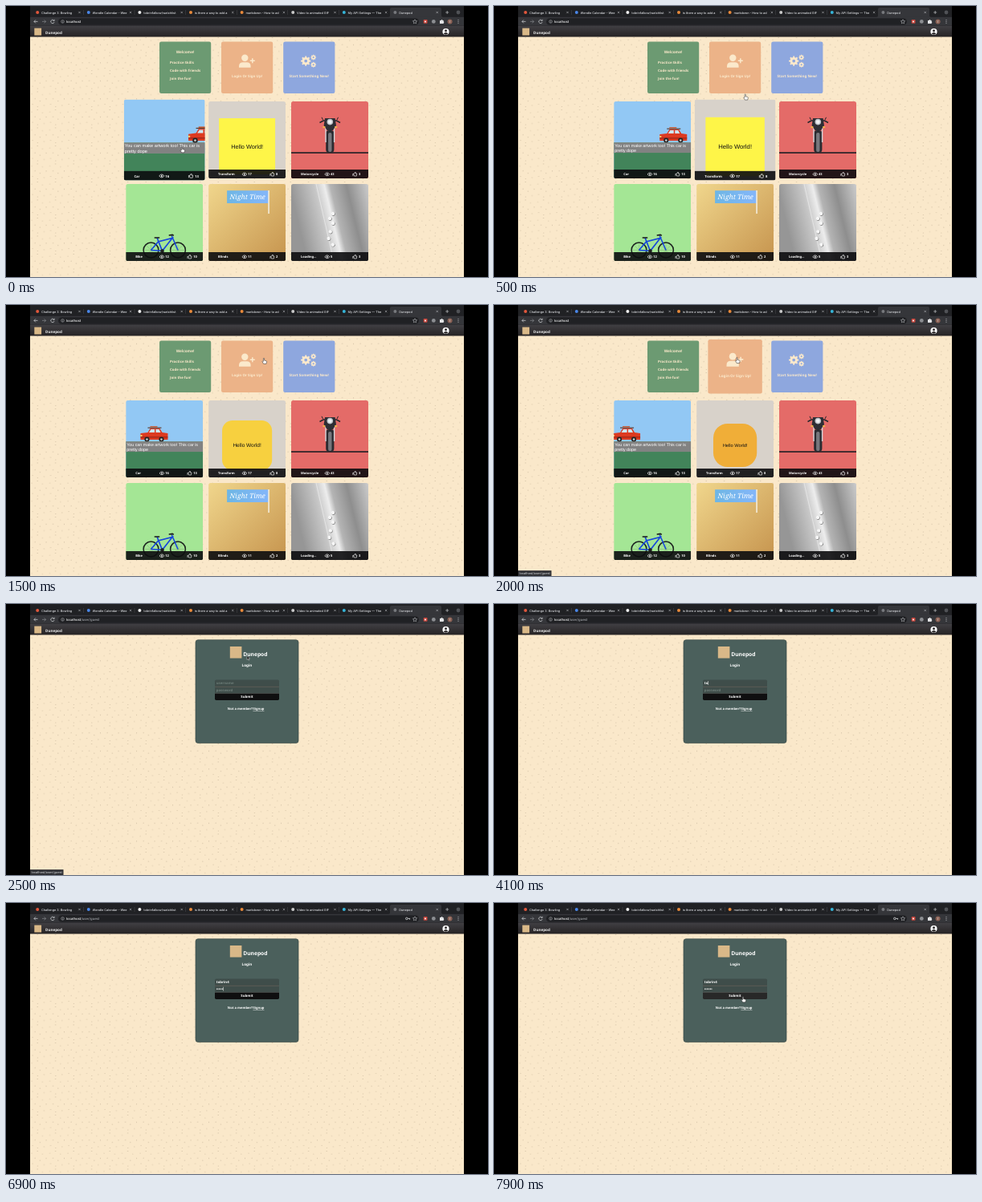
Animation, 600 px wide and 338 px high, one loop 8 s. Source, as an HTML page:

```html
<!DOCTYPE html>
<html lang="en">
<head>
<meta charset="utf-8">
<title>Dunepod</title>
<style>
  html, body { margin: 0; width: 100%; height: 100%; overflow: hidden; background: #000; }
  svg { display: block; width: 100vw; height: 100vh; }
  text { font-family: "Noto Sans", "Open Sans", sans-serif; font-weight: 600; text-rendering: geometricPrecision; }
  .ui { font-family: Inter, Roboto, sans-serif; font-weight: 500; }
  .art { font-family: "Liberation Sans", sans-serif; font-weight: 400; }
</style>
</head>
<body>
<svg id="stage" viewBox="0 0 600 338"></svg>
<script>
const LOOP = 8000;
const CREAM = '#fbe9cb', TAN = '#d9b888';

const rect = (x, y, w, h, fill, extra = '') =>
  `<rect x="${x}" y="${y}" width="${w}" height="${h}" fill="${fill}" ${extra}/>`;
const circle = (x, y, r, fill, extra = '') =>
  `<circle cx="${x}" cy="${y}" r="${r}" fill="${fill}" ${extra}/>`;
const line = (d, stroke, width = .6, extra = '') =>
  `<path d="${d}" fill="none" stroke="${stroke}" stroke-width="${width}" ${extra}/>`;
const shape = (d, fill, extra = '') => `<path d="${d}" fill="${fill}" ${extra}/>`;
const text = (x, y, size, str, fill = '#fff', extra = '') =>
  `<text x="${x}" y="${y}" font-size="${size}" fill="${fill}" ${extra}>${str}</text>`;
const group = (inner, extra = '') => `<g ${extra}>${inner}</g>`;
const MID = 'text-anchor="middle"';

const defs = `<defs>
  <pattern id="dots" x="30" y="38" width="22.5" height="22.5" patternUnits="userSpaceOnUse">
    ${rect(0, 0, 22.5, 22.5, '#fae8ca')}
    ${[[2, 4], [9, 1.5], [15.5, 5], [20, 10.5], [6, 10], [12.5, 13], [3, 17], [17.5, 18.5], [9.5, 20]]
      .map(([x, y]) => circle(x, y, .42, '#9c8a70')).join('')}
  </pattern>
  <linearGradient id="nav" x2="0" y2="1"><stop stop-color="#414044"/><stop offset="1" stop-color="#262324"/></linearGradient>
  <linearGradient id="sand" x2="1" y2="1"><stop stop-color="#f0d68c"/><stop offset="1" stop-color="#c6944e"/></linearGradient>
  <linearGradient id="flag"><stop stop-color="#6db6e4"/><stop offset="1" stop-color="#84b6fa"/></linearGradient>
  <linearGradient id="metal" y1=".12" x2="1" y2="-.12">
    <stop stop-color="#969696"/><stop offset=".3" stop-color="#c6c6c6"/><stop offset=".43" stop-color="#ededed"/>
    <stop offset=".5" stop-color="#b4b4b4"/><stop offset=".7" stop-color="#8e8e8e"/><stop offset="1" stop-color="#d2d2d2"/>
  </linearGradient>
  <clipPath id="cardClip"><rect width="96" height="96" rx="2.6"/></clipPath>
  <clipPath id="page"><rect x="30" width="540" height="338"/></clipPath>
  <clipPath id="tabClip"><rect width="43.5" height="14"/></clipPath>
</defs>`;

/* Browser window */
const tabs = [
  ['Challenge 3: Bowling', '#e2573c'], ['Wendle Calendar - Wee', '#4a86e8'],
  ['tobrinfalkow/watchlist', '#eee'], ['is there a way to add a', '#e8893a'],
  ['markdown - How to ad', '#e8893a'], ['Video to animated GIF', '#c9c9c9'],
  ['My API Settings — The', '#35b4d8'], ['Dunepod', '#77797d']
];
const cross = (x, y) => line(`M${x - 1.2} ${y - 1.2}l2.4 2.4m0 -2.4l-2.4 2.4`, '#c4c6ca', .5);

function browser() {
  let out = rect(30, 0, 540, 14, '#202124') +
    shape('M476 14q2 0 2-2V4q0-2 2-2h60q2 0 2 2v8q0 2 2 2z', '#35363a') +
    rect(30, 13.8, 540, 10.8, '#35363a');
  tabs.forEach(([name, color], i) => {
    const x = 39.2 + i * 63.6;
    out += circle(x, 8, 2, color) + cross(x + 52.3, 8) +
      group(text(0, 9.5, 3.8, name, '#dcdee2', 'class="ui"'), `transform="translate(${x + 4.8} 0)" clip-path="url(#tabClip)"`);
    if (i < 6) out += rect(x + 57, 5, .4, 6, '#54565a');
  });
  out += line('M547.2 8h4m-2-2v4', '#d5d7da', .6) + circle(563, 8, 2.4, '#505256') +
    line('M39.5 19.4h-4.6m2-2l-2 2 2 2', '#d5d7da', .7) +
    line('M45 19.4h4.6m-2-2l2 2-2 2', '#85878b', .7) +
    line('M59.6 18a2.2 2.2 0 1 0 .5 2M60.2 16.8v1.6h-1.7', '#d5d7da', .7) +
    rect(65, 15.2, 449, 8.6, '#202124', 'rx="4.3"') +
    circle(70.5, 19.4, 1.8, 'none', 'stroke="#c5c7ca" stroke-width=".5"') +
    line('M70.5 18.4v.3m0 .5v1.3', '#c5c7ca', .5) +
    `<text class="ui" x="75" y="21" font-size="4.2" fill="#fff">localhost<tspan id="path" fill="#a3a6aa">/user/guest</tspan></text>` +
    shape('M509 16.8l.8 1.7 1.8.2-1.3 1.3.3 1.8-1.6-.9-1.6.9.3-1.8-1.3-1.3 1.8-.2z', 'none', 'stroke="#d5d7da" stroke-width=".5"') +
    rect(519.7, 17, 4.8, 4.8, '#c9473e', 'rx=".8"') + circle(522, 19.4, 1, '#fff') +
    circle(532.3, 19.4, 2.4, '#8c8e92') +
    shape('M540 18h1.5a1 1 0 0 1 2 0h1.2v1.4a1 1 0 0 1 0 1.8v.9H540z', '#e3e4e6') +
    circle(552.6, 19.4, 3, '#8b6256') + text(552.6, 20.6, 3.2, 'T', '#fff', MID + ' class="ui"') +
    [17.6, 19.4, 21.2].map(y => circle(563, y, .5, '#d5d7da')).join('') +
    group(circle(498.8, 19.4, 1.3, 'none', 'stroke="#d5d7da" stroke-width=".8"') +
      line('M500.1 19.4h3m-.6 0v1.3', '#d5d7da', .8), 'id="key"');
  return out;
}

const navbar = rect(30, 24.5, 540, 14, 'url(#nav)') + rect(35.3, 27.6, 8.8, 9, TAN) +
  text(49, 35.3, 4.6, 'Dunepod', '#ececec') +
  circle(547.5, 32, 4.1, '#fff') + circle(547.5, 30.8, 1.5, '#302d2e') + shape('M544.7 34.4q2.8-2.8 5.6 0q-2.8 2.6-5.6 0z', '#302d2e');

/* Home page */
const tile = (id, x, fill, inner) =>
  group(rect(x, 44.6, 64.2, 64.4, fill, 'rx="2.2"') + inner, `id="${id}"`);

function cog(x, y, r) {
  let teeth = '';
  for (let i = 0; i < 8; i++) teeth += rect(x - r * .2, y - r * 1.3, r * .4, r * .6, CREAM, `transform="rotate(${i * 45} ${x} ${y})"`);
  return teeth + circle(x, y, r * .7, 'none', `stroke="${CREAM}" stroke-width="${r * .6}"`);
}

const tiles =
  tile('welcome', 191, '#6c9a72', text(223, 59, 4.7, 'Welcome!', CREAM, MID) +
    ['Practice Skills', 'Code with friends', 'Join the fun!'].map((s, i) => text(204, 72.3 + i * 9.6, 4.35, s, CREAM)).join('')) +
  tile('login', 268, '#ecb388', circle(297.3, 64.8, 4.2, CREAM) +
    shape('M290 76.8v-1.8q0-4.8 5-4.8h4.6q5 0 5 4.8v1.8z', CREAM) + line('M303.8 68.3h6m-3-3v6', CREAM, 1.5) +
    text(300, 89.4, 4.4, 'Login Or Sign Up!', CREAM, MID)) +
  tile('start', 345.2, '#8ea7de', cog(373.2, 68.6, 4.7) + cog(382.7, 64, 2.6) + cog(382.7, 73.2, 2.6) +
    text(377.2, 89.4, 4.5, 'Start Something New!', CREAM, MID));

const car = group(
  shape('M0 41l9-1 3-5h12l3 5 7 1v8H0z', '#dd3a20') + shape('M10.5 40l2.5-4h4.5v4zM19 40v-4h4l2 4z', '#cfe6f2') +
  rect(9, 33.6, 17, 1.1, '#5a3524') + rect(12, 32.2, 9, 1.5, '#c5562c') + rect(0, 45.4, 34, 1, '#8f2116') +
  rect(0, 43, 2, 2, '#ffd76b') +
  [8, 26].map(x => circle(x, 48.6, 3.1, '#252525') + circle(x, 48.6, 1.3, '#c8c8c8')).join(''), 'id="car"');

const carArt = rect(0, 0, 96, 96, '#92c8f4') + rect(0, 64, 96, 32, '#42845a') + rect(0, 51, 96, 13, '#6fa68b') + car +
  rect(0, 51.3, 96, 12.8, '#828282') +
  ['You can make artwork too! This car is', 'pretty dope'].map((s, i) => text(1, 57 + i * 6, 5.35, s, '#fff', 'class="art"')).join('');

const transformArt = rect(0, 0, 96, 96, '#d8d2ca') +
  group(`<rect id="morph" x="-35" y="-35" width="70" height="70"/>` + text(0, 2.6, 7.35, 'Hello World!', '#111', MID + ' class="art"'), 'id="morphBox"');

const motoArt = rect(0, 0, 96, 96, '#e46b68') + rect(0, 63.2, 96, 1.7, '#2a2227') +
  rect(43.2, 36, 10.2, 28, '#2b2b30', 'rx="4"') + rect(46.1, 39, 4.4, 24, '#77777d', 'rx="2"') +
  line('M43 29v22M53.6 29v22', '#d5d5da', 1.4) +
  line('M35.5 26.5l4.5-2.5h16.5l4.5 2.5', '#26262b', 1.5) + line('M39.5 23l-1.5-3.2M57 23l1.5-3.2', '#26262b', 1) +
  shape('M42 21h12.6l1.4 9-4 6h-7.4l-4-6z', '#2e2e34') + circle(48.3, 25.6, 3.8, '#bfc3c9') + circle(48.3, 25.6, 2.4, '#eef0f2') +
  rect(39.4, 31, 3, 2.2, '#efb04c') + rect(54.2, 31, 3, 2.2, '#efb04c');

const wheel = x => circle(x, 82.5, 9.4, 'none', 'stroke="#1c2420" stroke-width="1.5"') +
  line(`M${x - 9} 82.5h18M${x} 73.5v18M${x - 6.4} 76.1l12.8 12.8m0-12.8l-12.8 12.8`, '#5c7a58', .25);
const bikeArt = rect(0, 0, 96, 96, '#a4e695') + wheel(31.3) + wheel(64.8) +
  line('M31.3 82.5l9-10.5 17.5-4.5-12.5 16-6.5-16.5M31.3 82.5l14 1', '#1747dc', 1.7) +
  line('M57 64.5l7.8 18', '#1747dc', 1.6) + line('M35.5 67h6.5M53.5 64l4.5-.6 1.6 1', '#181818', 1.5) +
  circle(45.3, 83.5, 2.3, '#202020') + line('M45.3 83.5l2.5 5', '#202020', .9);

const blindsArt = rect(0, 0, 96, 96, 'url(#sand)') + rect(23, 8.2, 51.6, 15.8, 'url(#flag)') +
  text(48.6, 19, 8.6, 'Night Time', '#fff', MID + ' style="font:italic 400 8.6px \'Noto Serif\',serif"') +
  rect(74.2, 8, 1.5, 29, '#f4efe3');

const balls = [[52, 37], [48, 43], [52, 49], [48.7, 59.5], [47, 68], [52.3, 75.7]];
const loadingArt = rect(0, 0, 96, 96, 'url(#metal)') + line('M31 0L53 96', '#f4f4f4', .6) +
  balls.map(([x, y]) => group(circle(x + .5, y + .6, 2.3, '#777') + circle(x, y, 2.2, '#f6f6f6'), 'class="ball"')).join('');

function card(id, x, y, art, name, views, likes) {
  const footer = rect(0, 85, 96, 11, '#0d0d0f', 'opacity=".9"') +
    text(12, 92.3, 4, name) +
    line('M41.8 90.8q3-3.7 6 0q-3 3.7-6 0z', '#fff', .7) + circle(44.8, 90.8, .9, '#fff') + text(49, 92.3, 4, views) +
    line('M77.4 90.2h1l1.3-2.2q1 .4.4 2h1.7l-.5 3h-2.9zM76.8 90v3', '#fff', .6) + text(84, 92.3, 4, likes, '#fff');
  return group(group(art + footer, `transform="translate(${x} ${y})"`).replace('<g', '<g clip-path="url(#cardClip)"'), `id="${id}"`);
}

const home = tiles +
  card('carCard', 149.2, 119, carArt, 'Car', 16, 13) +
  card('morphCard', 252.1, 119, transformArt, 'Transform', 17, 8) +
  card('motoCard', 355, 119, motoArt, 'Motorcycle', 43, 3) +
  card('bikeCard', 149.2, 222, bikeArt, 'Bike', 12, 10) +
  card('blindsCard', 252.1, 222, blindsArt, 'Blinds', 11, 2) +
  card('loadingCard', 355, 222, loadingArt, 'Loading...', 5, 3);

/* Login page */
const loginPage = rect(236, 44.8, 128, 128.6, '#4b605c', 'rx="3" stroke="#3b4c48" stroke-width=".7"') +
  rect(278.8, 53, 14.6, 14.6, TAN) + text(295.2, 65, 6.7, 'Dunepod') +
  text(300, 78, 4.6, 'Login', '#fff', MID) +
  shape('M260 103.2V96.2q0-1.6 1.6-1.6h76.8q1.6 0 1.6 1.6v7z', '#3f4d4a') + rect(260, 103.2, 80, 8.6, '#3f4d4a') +
  rect(260, 102.9, 80, .5, '#74645c') + rect(260, 111.2, 80, .5, '#62605a') +
  text(261.8, 100.1, 4.3, '', '#fff', 'id="user"') + text(261.8, 108.7, 4.3, '', '#fff', 'id="pass"') +
  group('', 'id="secret"') + rect(0, 0, .5, 5, '#fff', 'id="caret"') +
  `<path id="submit" d="M260 111.7h80v6.6q0 1.7-1.7 1.7h-76.6q-1.7 0-1.7-1.7z"/>` +
  text(300, 117.3, 4.3, 'Submit', '#fff', MID) +
  text(275.8, 132.3, 4.1, 'Not a member?') + text(307.4, 132.3, 4.1, 'Signup', '#fff', 'text-decoration="underline"');

const status = group(rect(30, 331.2, 41.5, 7, '#2e2f33') + text(31.5, 336.2, 3.9, 'localhost/user/guest', '#c6c8cb', 'class="ui"'), 'id="status"');

const cursors = group(
  shape('M-.6 0q.6-.7 1.2 0v2.6l2.4.6q.8.3.6 1.2l-.6 2.4h-3.4L-2 4.1q.1-.9 1.4-.2z', '#fff', 'id="hand" stroke="#111" stroke-width=".45"') +
  shape('M0 0v5l1.2-1.1.9 1.9.8-.4-.9-1.8h1.6z', '#111', 'id="arrow" stroke="#fff" stroke-width=".4"') +
  line('M-1 -2.5h2m-1 0v5m-1 0h2', '#fff', .5, 'id="beam"'), 'id="cursor"');

const stage = document.getElementById('stage');
stage.innerHTML = defs + rect(0, 0, 600, 338, '#000') +
  group(rect(30, 38, 540, 300, 'url(#dots)') + browser() + navbar +
    group(home, 'id="home"') + group(loginPage, 'id="loginPage"') + status + cursors, 'clip-path="url(#page)"');

const $ = id => document.getElementById(id);
const show = (id, on) => $(id).setAttribute('display', on ? 'inline' : 'none');
const set = (id, name, value) => $(id).setAttribute(name, value);
const clamp = v => Math.min(1, Math.max(0, v));
const smooth = v => v * v * (3 - 2 * v);

// Eased value list at time t from steps [time, ...values].
function at(t, steps) {
  const next = steps.findIndex(s => s[0] > t);
  if (next === 0) return steps[0].slice(1);
  if (next < 0) return steps[steps.length - 1].slice(1);
  const a = steps[next - 1], b = steps[next];
  const k = smooth((t - a[0]) / (b[0] - a[0]));
  return a.slice(1).map((v, i) => v + (b[i + 1] - v) * k);
}

const ENTER = 2400;
const pointer = [[0, 219, 176], [100, 219, 176], [800, 373, 68], [1100, 373, 68], [1700, 303, 66], [2300, 302, 65.5],
  [2500, 300, 64.5], [2800, 300, 64.5], [3400, 334, 100], [3800, 334, 100], [7250, 334, 100], [7700, 310, 117]];
const morph = [[0, 1, 0, 245, 72], [700, 1, 1, 245, 72], [1000, 1, 6, 243, 70], [2000, .775, 23, 174, 56], [2500, .7, 35, 150, 50]];
// id, centre x and y, hover start, hover end
const hovers = [['carCard', 197.2, 167, -400, 250], ['morphCard', 300.1, 167, 300, 500],
  ['start', 377.3, 76.8, 600, 1250], ['login', 300.1, 76.8, 1500, 9000]];
const NAME = 'tobrin4', nameTimes = [4000, 4100, 4200, 4350, 4450, 4600, 5200];
const dotTimes = [6000, 6200, 6400, 6600, 6700, 6900, 7100];
const typed = (times, t) => times.filter(s => s <= t).length;

function field(id, value, hint) {
  $(id).textContent = value || hint;
  set(id, 'fill', value ? '#fff' : '#6d7d78');
}

function draw(t) {
  const onLogin = t >= ENTER;
  show('home', !onLogin);
  show('loginPage', onLogin);
  show('path', onLogin);
  show('status', t >= 1700 && t < 2900);
  show('key', t >= 6100);

  const [px, py] = at(t, pointer);
  const overSubmit = t > 7250 && py > 111.5;
  const beam = t > 3250 && !overSubmit;
  show('cursor', t < 3850 || t >= 7300);
  set('cursor', 'transform', `translate(${px} ${py})`);
  show('hand', !onLogin || overSubmit);
  show('arrow', onLogin && !overSubmit && !beam);
  show('beam', beam);

  if (!onLogin) {
    for (const [id, x, y, from, to] of hovers) {
      const s = 1 + .05 * smooth(clamp((t - from) / 200)) * (1 - smooth(clamp((t - to) / 200)));
      set(id, 'transform', `translate(${x} ${y}) scale(${s}) translate(${-x} ${-y})`);
    }
    set('car', 'transform', `translate(${76.5 - .0388 * t} 0)`);
    const [scale, radius, g, b] = at(t, morph);
    set('morphBox', 'transform', `translate(48 56) scale(${scale})`);
    set('morph', 'rx', radius);
    set('morph', 'fill', `rgb(${Math.round(240 + 14 * clamp((g - 174) / 71))},${Math.round(g)},${Math.round(b)})`);
    document.querySelectorAll('.ball').forEach((el, i) =>
      el.setAttribute('transform', `translate(${i > 2 ? .5 * Math.sin(t / 400 + i) : 0} 0)`));
    return;
  }

  const count = typed(nameTimes, t), dots = typed(dotTimes, t);
  field('user', NAME.slice(0, count), 'username');
  field('pass', '', dots ? '' : 'password');
  $('secret').innerHTML = Array.from({ length: dots }, (_, i) => circle(262.5 + i * 1.4, 107.2, .6, '#fff')).join('');

  const inPass = t >= 5600;
  const blinkOff = t >= 5000 && t < 5200 || t >= 7300;
  show('caret', t >= 3600 && !blinkOff);
  set('caret', 'x', inPass ? 261.8 + dots * 1.4 : 262 + (count ? $('user').getComputedTextLength() : 0));
  set('caret', 'y', inPass ? 104.7 : 96);
  set('submit', 'fill', overSubmit ? '#282828' : '#0f0f10');
}

const start = performance.now();
function frame() {
  draw((performance.now() - start) % LOOP);
  requestAnimationFrame(frame);
}
frame();
</script>
</body>
</html>
```
